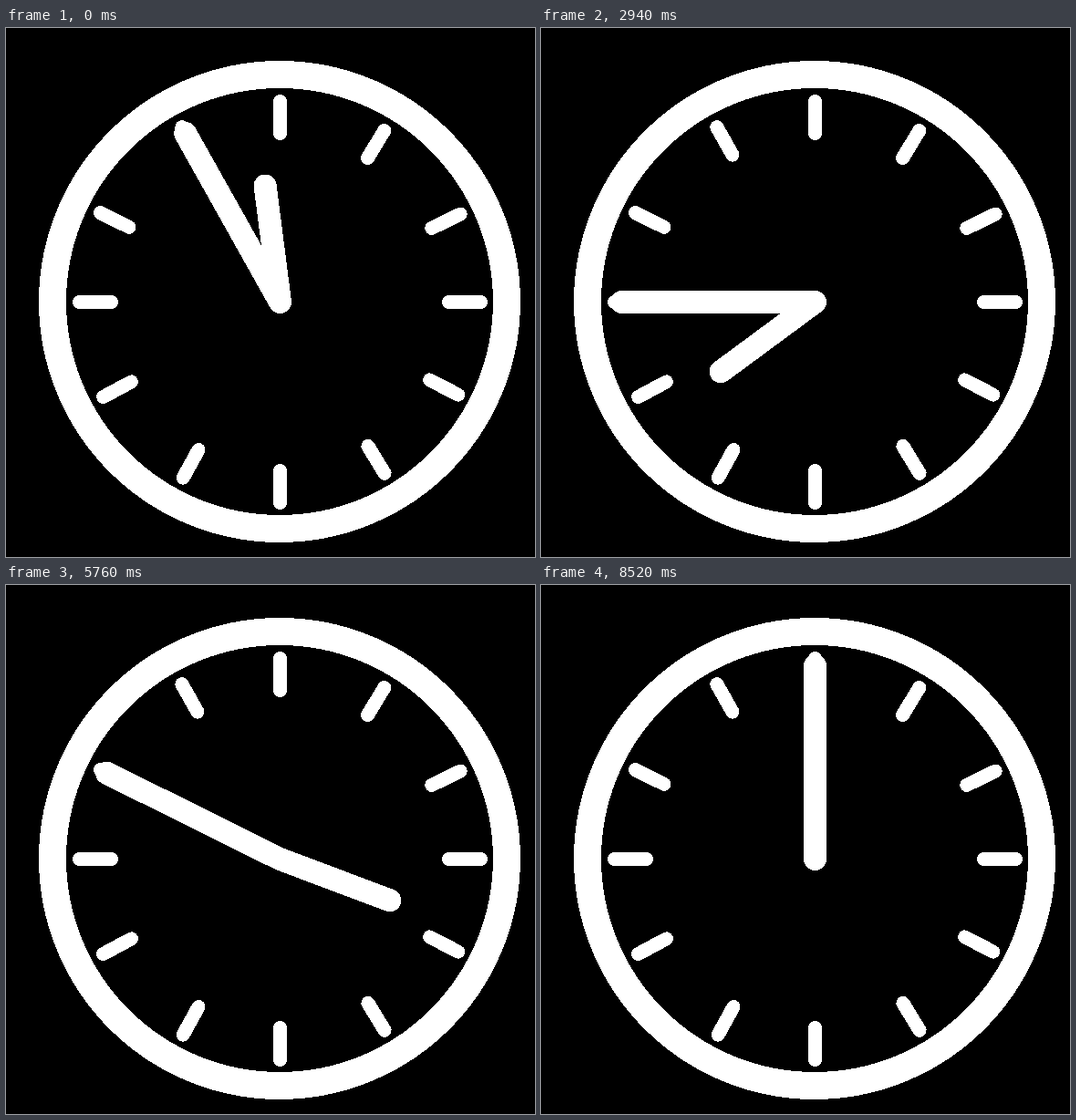
Recreate the animation shown at these times as an HTML page. Size 580x580 px, loop 8580 ms.

```html
<!DOCTYPE html>
<html lang="en">
<head>
<meta charset="utf-8">
<title>Clock running backwards</title>
<style>
  html, body { margin: 0; width: 100%; height: 100%; overflow: hidden; background: #000; }
  svg { display: block; width: 580px; height: 580px; }
  line, circle { fill: none; stroke: #fff; stroke-linecap: round; shape-rendering: crispEdges; }
</style>
</head>
<body>
<svg viewBox="0 0 580 580">
  <circle cx="300" cy="300" r="249" stroke-width="30"/>
  <g id="ticks" stroke-width="15"></g>
  <g stroke-width="25">
    <line id="hour"/>
    <line id="minute"/>
  </g>
</svg>
<script>
const CENTER = 300.5;
const STEP_MS = 60;
const STEPS = 143;
const HOUR_LENGTH = 128.5;
const MINUTE_LENGTH = 212;

// The dial is drawn by hand: degrees of each hour, from 12 clockwise.
const ANGLES = [0, 31.3, 64, 90, 117.5, 148.6, 180, 208.9, 241.8, 270, 296.4, 330.7, 360];

// Angle of a position in hours, which may lie between two marks.
function dialAngle(position) {
  const i = Math.floor(position);
  const from = ANGLES[i];
  return from + (ANGLES[(i + 1) % 13] - from) * (position - i);
}

// Lays a line along the radius at a dial position.
function setRadial(line, position, inner, outer) {
  const a = dialAngle(position) * Math.PI / 180;
  [inner, outer].forEach((r, i) => {
    line.setAttribute('x' + (i + 1), CENTER + r * Math.sin(a));
    line.setAttribute('y' + (i + 1), CENTER - r * Math.cos(a));
  });
}

const ticks = document.getElementById('ticks');
for (let hour = 0; hour < 12; hour++) {
  const line = document.createElementNS('http://www.w3.org/2000/svg', 'line');
  setRadial(line, hour, 185, 220);
  ticks.append(line);
}

const hourHand = document.getElementById('hour');
const minuteHand = document.getElementById('minute');

function draw(ms) {
  const step = Math.floor(ms / STEP_MS) % STEPS;
  // Five minutes back per step; 10:15 is skipped.
  const time = 5 * (step < 20 ? STEPS - step : STEPS - 1 - step);
  // The hour hand moves once per quarter.
  setRadial(hourHand, Math.floor(time / 15) / 4, 0, HOUR_LENGTH);
  setRadial(minuteHand, (time % 60) / 5, 0, MINUTE_LENGTH);
}

const start = performance.now();
function loop() {
  draw(performance.now() - start);
  requestAnimationFrame(loop);
}
loop();
</script>
</body>
</html>
```
